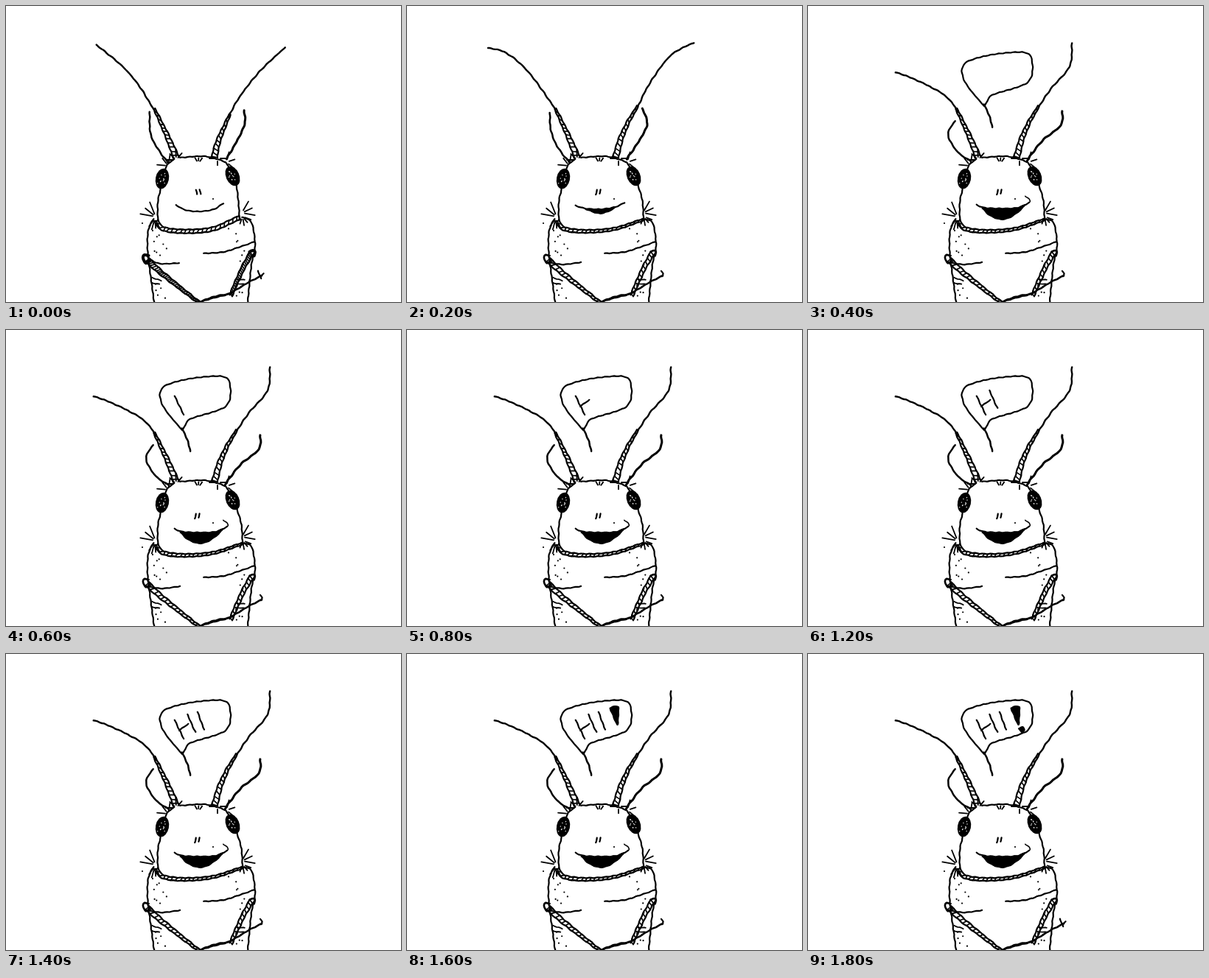
An HTML page with a canvas for the animation above (2 s loop, 536x402 px).

```html
<!DOCTYPE html>
<html lang="en">
<head>
<meta charset="utf-8">
<title>Bug says hi</title>
<style>
html, body { margin: 0; width: 100%; height: 100%; overflow: hidden; background: #fff; }
canvas { display: block; }
</style>
</head>
<body>
<canvas id="stage" width="536" height="402"></canvas>
<script>
const ctx = document.getElementById('stage').getContext('2d');
const STEP = 200, STEPS = 10, PEN = 2.2;
ctx.lineCap = ctx.lineJoin = 'round';

function seeded(seed) {
  return () => (seed = seed * 16807 % 2147483647) / 2147483647;
}

// Catmull-Rom samples through a few key points, with a hand-drawn tremble.
function smooth(text) {
  const p = text.split(' ').map(pair => pair.split(',').map(Number));
  const at = i => p[Math.max(0, Math.min(p.length - 1, i))];
  const out = [];
  for (let i = 0; i < p.length - 1; i++) {
    const [a, b, c, d] = [at(i - 1), at(i), at(i + 1), at(i + 2)];
    const count = Math.ceil(Math.hypot(c[0] - b[0], c[1] - b[1]) / 3);
    for (let j = i ? 1 : 0; j <= count; j++) {
      const t = j / count;
      const [x, y] = [0, 1].map(k => b[k] + t / 2 * (c[k] - a[k]
        + t * (2 * a[k] - 5 * b[k] + 4 * c[k] - d[k] + t * (3 * (b[k] - c[k]) + d[k] - a[k]))));
      out.push([x + 0.4 * Math.sin(y * 0.55), y + 0.4 * Math.sin(x * 0.6)]);
    }
  }
  return out;
}

function line(samples, width = PEN) {
  ctx.beginPath();
  samples.forEach(s => ctx.lineTo(...s));
  ctx.lineWidth = width;
  ctx.stroke();
}

function curve(text, width) {
  line(smooth(text), width);
}

function blob(text) {
  line(smooth(text), 1.5);
  ctx.fill();
}

// Tapering limb around a centre line, filled with slanted hatching.
function limb(text, from, to, gap = 2) {
  const mid = smooth(text), last = mid.length - 1;
  const edge = side => mid.map(([x, y], i) => {
    const a = mid[Math.max(0, i - 1)], b = mid[Math.min(last, i + 1)];
    const angle = Math.atan2(b[1] - a[1], b[0] - a[0]);
    const r = side * (from + (to - from) * i / last) / 2;
    return [x - r * Math.sin(angle), y + r * Math.cos(angle)];
  });
  const left = edge(1), right = edge(-1);
  line(left);
  line(right);
  for (let i = 0; i < last; i += gap) line([left[i], right[i + 1]], 1.7);
}

function fan(x, y, start, end, count, length, width = 1.8) {
  for (let i = 0; i < count; i++) {
    const angle = (start + (end - start) * i / (count - 1)) * Math.PI / 180;
    const reach = length * (i % 2 ? 0.85 : 1);
    line([[x + 4 * Math.cos(angle), y + 4 * Math.sin(angle)],
          [x + reach * Math.cos(angle), y + reach * Math.sin(angle)]], width);
  }
}

function dot(x, y) {
  ctx.beginPath();
  ctx.arc(x, y, 1.1, 0, 7);
  ctx.fill();
}

// Loosely jittered rows of dots.
function stipple(x, y, w, h, count, seed) {
  const random = seeded(seed);
  for (let i = 0; i < count; i++) dot(x + w * random(), y + h * (i + random()) / count);
}

function eye(x, y, angle, seed) {
  const random = seeded(seed);
  ctx.save();
  ctx.translate(x, y);
  ctx.rotate(angle);
  ctx.beginPath();
  ctx.ellipse(0, 0, 9, 14, 0, 0, 7);
  ctx.fill();
  ctx.fillStyle = '#fff';
  for (let i = 0; i < 12; i++) {
    ctx.fillRect(random() * 10 - 5.5, random() * 17 - 9, 1.1, 1.3);
  }
  ctx.restore();
}

const poses = [
  {
    leftFeeler: '123,53 158,82 181,109 200,140',
    rightFeeler: '379,56 345,88 318,122 303,148',
    leftHorn: '195,144 196,173 206,194 220,213',
    rightHorn: '323,142 324,160 313,184 299,208',
    mouth() { curve('231,270 243,277 262,279 282,276 295,268'); }
  },
  {
    leftFeeler: '110,57 135,64 165,90 200,138',
    rightFeeler: '389,50 358,67 330,104 314,135',
    leftHorn: '194,145 195,168 204,191 220,212',
    rightHorn: '319,139 326,160 315,183 298,208',
    mouth() {
      curve('229,271 242,275 262,276 283,273 295,267');
      blob('242,276 263,277 282,274 263,282 242,276');
    }
  },
  {
    leftFeeler: '119,90 148,101 185,121 204,143',
    rightFeeler: '358,50 355,82 330,112 313,137',
    leftHorn: '200,156 190,174 202,197 221,211',
    rightHorn: '345,143 343,162 318,183 297,210',
    mouth() {
      curve('229,270 240,274 262,275 285,274 300,267');
      blob('236,275 262,276 285,274 295,270 280,284 264,290 249,286 236,275');
      curve('295,258 300,262 301,266', 1.6);
    }
  }
];

function drawFeelers(pose, first) {
  curve(pose.leftFeeler, 2.4);
  curve(pose.rightFeeler, 2.4);
  limb('201,139 212,162 222,184 231,206', 2, 8);
  limb(first ? '304,147 294,169 286,190 283,206' : '313,136 300,158 290,181 283,206', 2, 8);
  curve(pose.leftHorn, 2.5);
  curve(pose.rightHorn, 3);
}

function drawHead(first) {
  const jaw = first ? 317 : 321;
  curve('228,208 217,219 210,248 206,267 206,291');
  curve('236,206 265,204 280,206 298,212');
  curve(`299,213 311,238 ${jaw - 2},262 ${jaw},290`);
  fan(220, 217, 185, 280, 3, 15);
  fan(231, 209, 180, 310, 4, 14);
  fan(299, 212, 40, -75, 3, 14);
  fan(287, 207, 0, 180, 3, 11);
  fan(261, 214, 240, 305, 3, 9);
  eye(212, 234.5, 0.2, 7);
  eye(307.5, 231, -0.42, 11);
  const slant = first ? -1 : 2;
  curve(`258,250 ${258 - slant},256`);
  curve(`263,249 ${263 - slant},255`);
  dot(281, 262);
}

function drawBody(first) {
  const top = first ? 287 : 290;
  limb(`204,291 212,302 240,306 280,303 ${first ? 317 : 321},${top}`, 5, first ? 5 : 2.5);
  curve('200,289 193,305 192,328 194,350 201,402');
  curve(`320,${top} 333,294 338,325 333,352 328,402`);
  fan(203, 286, 190, 248, 3, 21);
  fan(320, 281, -60, 10, 3, 18);
  fan(202, 288, 65, 125, 4, 16);
  fan(321, 286, 20, 110, 4, 12);
  dot(185, 295);

  stipple(199, 305, 23, 37, 9, 23);
  stipple(302, 302, 24, 54, 9, 31);
  stipple(203, 377, 14, 20, 5, 47);
  stipple(312, 377, 11, 20, 5, 59);
  for (let i = 0; i < 2; i++) {
    curve(`198,${369 + 7 * i} ${211 - 3 * i},${373 + 5 * i}`, 1.8);
    curve(`${312 + i},${371 + 6 * i} 324,${372 + 6 * i}`, 1.8);
  }
  curve(first ? '196,345 210,350 235,349' : '195,349 213,351 236,348');
  curve('268,336 295,334 318,327 337,320');
}

function drawLegs(step) {
  const first = step === 0, gap = first ? 1 : 2;
  limb('191,344 208,360 234,381 261,402', 7, 3, gap);
  limb('333,336 321,357 305,393', 6, 4, gap);
  curve('194,339 188,338 186,344 190,349 195,345', first ? 4 : 2.6);
  curve('330,334 337,332 337,339', first ? 4 : 2.6);
  curve('262,402 285,394 304,390 326,377 347,366', 2.5);
  curve('263,402 284,396 304,391');
  if (first || step === STEPS - 1) {
    curve('342,360 346,370');
    curve('345,367 350,363');
  } else {
    curve('345,360 348,363 346,367');
  }
}

function drawBubble(step) {
  curve('239,136 213,103 212,79 245,67 293,63 304,75 302,99 285,110 250,121 240,136');
  curve('239,134 246,149 250,165', 2.5);
  if (step >= 3) curve('229,90 241,115');
  if (step >= 4) curve('235,104 247,95');
  if (step >= 6) curve('246,82 257,106');
  if (step >= 7) curve('260,79 269,103');
  if (step >= 8) blob('275,73 281,71 287,72 287,83 285,96 275,73');
  if (step >= 9) blob('286,101 292,99 294,103 290,107 286,101');
}

function draw(step) {
  const pose = poses[Math.min(step, 2)], first = step === 0;
  ctx.fillStyle = '#fff';
  ctx.fillRect(0, 0, 536, 402);
  ctx.fillStyle = ctx.strokeStyle = '#000';
  drawBody(first);
  drawLegs(step);
  drawHead(first);
  drawFeelers(pose, first);
  pose.mouth();
  if (step >= 2) drawBubble(step);
}

let shown = -1;
function tick() {
  const step = Math.floor(performance.now() / STEP) % STEPS;
  if (step !== shown) draw(shown = step);
  requestAnimationFrame(tick);
}
tick();
</script>
</body>
</html>
```
